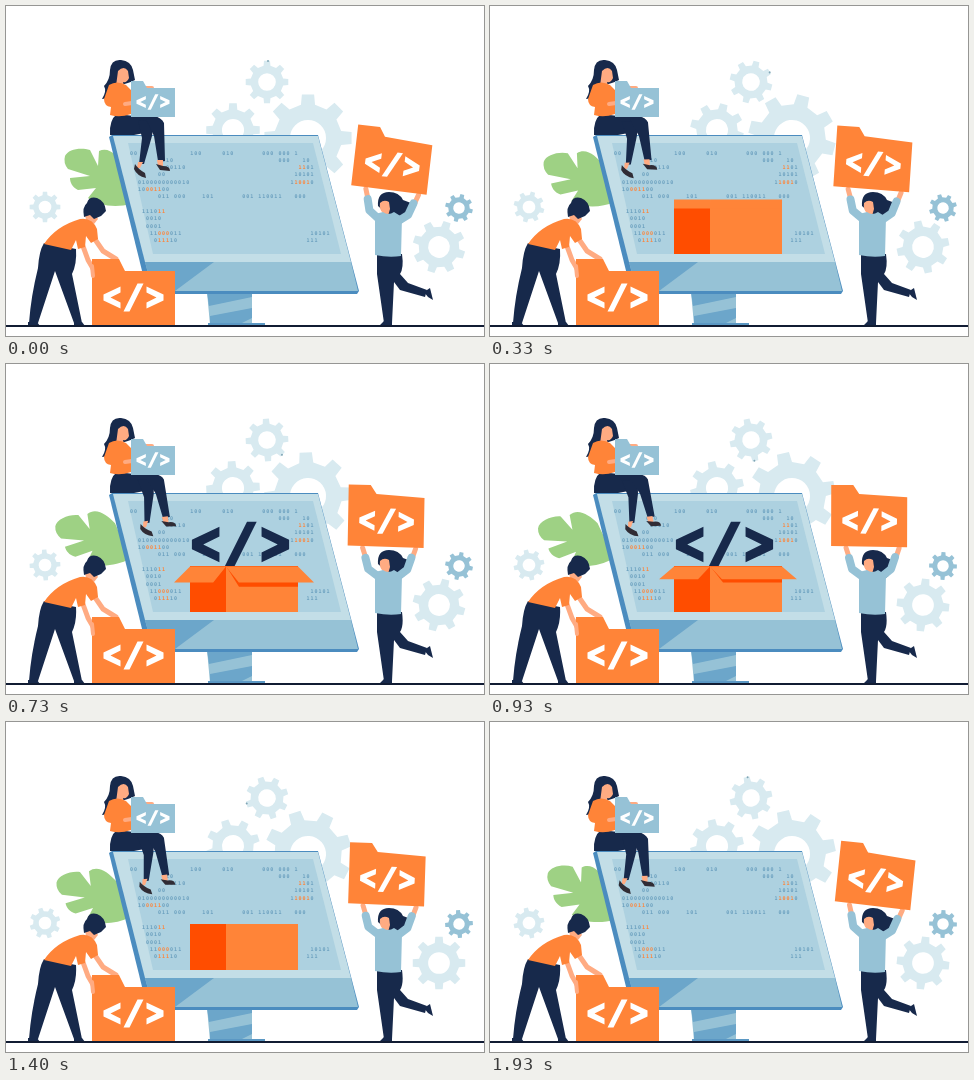
Animation of 478 by 330 pixels, one loop 1990 ms. Source, as an HTML page:

```html
<!DOCTYPE html>
<html lang="en">
<head>
<meta charset="utf-8">
<title>Code team</title>
<style>
html, body { margin: 0; width: 100%; height: 100%; overflow: hidden; background: #fff; }
svg { display: block; width: 478px; height: 330px; }
text { font: bold 5px "DejaVu Sans Mono", monospace; letter-spacing: 1px; fill: #6a9fbe; white-space: pre; }
.o { fill: #ff8438; }
.n { fill: #17294b; }
.b { fill: #96c2d6; }
.s { fill: #ffab82; }
.w { fill: #fff; }
.line { fill: none; stroke-linecap: round; stroke-linejoin: round; }
.skin { stroke: #ffab82; }
</style>
</head>
<body>
<svg viewBox="0 0 478 330">
  <defs>
    <g id="sign">
      <path id="bracket" d="M-13-11V-5L-23 0L-13 5V11L-30 3V-3Z"/>
      <use href="#bracket" transform="scale(-1 1)"/>
      <path d="M4-14H10L-4 14H-10Z"/>
    </g>
    <clipPath id="above"><path d="M150 130H320V205H150Z"/></clipPath>
  </defs>

  <g id="gears"></g>

  <path id="leaf" fill="#9ed184" d="M59 150C62 143 75 141 84 144L92 160L93 145C103 140 112 150 118 160L125 198C110 202 92 200 82 192L90 182L72 184C66 181 64 176 64 172L84 170L62 163Q57 157 59 150Z"/>

  <!-- monitor -->
  <path class="b" d="M201 286H246V319H204Z"/>
  <path fill="#6ca6ca" d="M201 286H246V291L203 300ZM204 310L246 302V312L232 319H204Z"/>
  <path fill="#5b98c4" d="M202 317H259V320H202Z"/>
  <path fill="#4b8cbf" d="M103 131L106 129H312L353 285L351 288H146L141 285Z"/>
  <path fill="#c3dee7" d="M107 130H312L345 256H139Z"/>
  <path class="b" d="M139 256H345L352 285H147Z"/>
  <path fill="#6ca6ca" d="M139 256H208L169 285H147Z"/>
  <path fill="#add1e0" d="M122 137H307L335 248H147Z"/>
  <g id="code"></g>

  <!-- parcel -->
  <g clip-path="url(#above)"><use id="bigSign" class="n" href="#sign"/></g>
  <g id="box">
    <path fill="#ff4d00" d="M184 202H220V248H184Z"/>
    <path class="o" d="M220 202H292V248H220Z"/>
    <path id="shade" fill="#ff4d00"/>
    <path id="flaps" class="o"/>
  </g>

  <!-- seated woman -->
  <path class="n" d="M104 64Q105 53 115 54Q125 55 127 64L129 74Q120 79 113 78Q111 92 96 93Q101 85 98 80Q104 74 104 64Z"/>
  <path class="s" d="M112 65Q118 59 122 65L123 72Q121 77 117 76L118 80H110Z"/>
  <path class="n" d="M104 129Q103 114 111 108L128 110Q147 108 153 112Q158 117 154 124L128 129Z"/>
  <g class="swing">
    <path class="n" d="M132 114L148 116L146 130L138 158H133L136 132Z"/>
    <path class="s" d="M132 156H137L134 162H131Z"/>
    <path fill="#302c35" d="M129 158Q132 163 139 167L140 172Q131 170 128 163Z"/>
  </g>
  <g class="swing">
    <path class="n" d="M140 113Q154 108 158 117L159 155H152L148 130Z"/>
    <path class="s" d="M151 154H157L157 160H152Z"/>
    <path fill="#302c35" d="M150 158L157 160Q164 160 164 165L154 164Z"/>
  </g>
  <path class="o" d="M103 79Q111 74 120 79L125 84V108Q114 112 104 109L105 101Q98 100 98 93Z"/>
  <path class="line skin" stroke-width="4" d="M140 82H146M119 98L126 97"/>
  <path class="b" d="M125 75H137L141 82H169V111H125Z"/>
  <use href="#sign" class="w" transform="translate(147 96)scale(.55)"/>

  <!-- bending woman -->
  <path class="n" d="M38 237L70 243Q71 258 66 268L76 317H68L49 265L32 317H23Q25 290 32 262Q33 245 38 237Z"/>
  <path class="n" d="M22 316H31L34 320H22ZM68 316H76L79 320H68Z"/>
  <path class="line skin" stroke-width="5" d="M74 232L82 254L89 266M86 229L97 245L110 253"/>
  <path class="s" d="M79 207L88 206L92 213L88 218L80 215Z"/>
  <path class="o" d="M38 238Q50 220 74 213Q86 211 91 223L92 233L85 237L80 230L79 241L72 243L70 234L65 244Z"/>
  <path class="n" d="M78 211Q76 201 81 197Q83 190 91 192Q99 195 100 205L95 210L88 213L84 209Z"/>
  <path class="o" d="M86 253H113L119 265H169V319H86Z"/>
  <path class="line skin" stroke-width="4" d="M86 260L87 270"/>
  <use href="#sign" class="w" transform="translate(127.500 291.500)"/>

  <!-- standing woman -->
  <path class="n" d="M371 248H396Q398 262 394 268L402 277L421 284L419 291L394 284L388 276L386 317H378L371 268Z"/>
  <path class="n" d="M378 315H386V320H373ZM418 286L424 282L427 294L422 291Z"/>
  <path class="n" d="M372 200Q371 186 383 186Q393 186 397 194L405 197L402 205Q400 214 391 216L380 207Z"/>
  <g id="lift">
    <path class="line skin" stroke-width="5" d="M356 184L359 193M409 184L406 193"/>
    <path class="line" stroke="#96c2d6" stroke-width="8" d="M359 194L362 205L373 213M405 193L401 205L391 213"/>
    <path class="o" d="M341 121H363L369 130L417 133V183L341 182Z"/>
    <use href="#sign" class="w" transform="translate(379.500 157)rotate(1)scale(.91)"/>
  </g>
  <path class="s" d="M374 197Q378 193 383 196L384 203L382 210L377 207Q373 204 374 197Z"/>
  <path class="b" d="M369 208L377 206Q382 210 388 206L396 211L395 250Q383 252 369 249Z"/>

  <path d="M0 320H478" stroke="#111c33" stroke-width="2"/>
</svg>
<script>
const LOOP = 1990, STEP = 200 / 3;
const $ = id => document.getElementById(id);
const set = (el, value) => el.setAttribute("transform", value);

// 0 before start, 1 after start + time, linear between
const ramp = (t, start, time) => Math.min(1, Math.max(0, (t - start) / time));

function gearPath(r, hole) {
  const points = [];
  for (let i = 0; i < 32; i++) {
    const outer = i % 4 == 1 || i % 4 == 2;
    const angle = (Math.floor(i / 4) * 45 + [-12, -8, 8, 12][i % 4]) * Math.PI / 180;
    const d = outer ? r : r * .77;
    points.push(`${(d * Math.sin(angle)).toFixed(2)} ${(-d * Math.cos(angle)).toFixed(2)}`);
  }
  return `M${points.join("L")}ZM${hole} 0A${hole} ${hole} 0 1 0 ${-hole} 0A${hole} ${hole} 0 1 0 ${hole} 0Z`;
}

function addGear(x, y, r, phase = 0, color = "#d8eaf0") {
  const gear = document.createElementNS("http://www.w3.org/2000/svg", "g");
  gear.innerHTML = `<path d="${gearPath(r, r * .41)}" fill="${color}" fill-rule="evenodd"/>`;
  $("gears").append(gear);
  return turn => set(gear, `translate(${x} ${y})rotate(${turn + phase})`);
}
const gears = [
  addGear(261, 76, 21.5), addGear(302, 132, 44), addGear(227, 124, 27), addGear(39, 201, 15.5),
  addGear(433, 241, 26.5, 18), addGear(453, 202, 14, 14, "#96c2d6")
];
$("gears").firstChild.innerHTML += '<circle cx="1" cy="-21" r="1" fill="#7fa5b5"/>';

// Layout of the screen: # blue digit, @ orange digit
const layout = `\
##             ###     ###       ### ### #
        ###                          ###   ##
         #####                            @@##
       ##                                #####
  #############                         #@@@@#
  ##@@@@##
       ### ###    ###       ### ######   ###

   ####@@
    ####
    ####
     ##@@@###                                #####
      #@@@##                                ###`;
let seed = 7;
const digit = () => (seed = seed * 16807 % 2147483647) % 3 ? 0 : 1;
$("code").innerHTML = layout.split("\n").map((row, i) =>
  `<text x="124" y="${148.5 + i * 7.3}">` +
  row.replace(/@+/g, '<tspan class="o">$&</tspan>').replace(/[#@]/g, digit) + "</text>").join("");

function draw(now) {
  const t = Math.floor((now % LOOP + 3.5) / STEP) * STEP;
  const sway = Math.abs(1 - t / 1000) ** 1.4;

  gears.forEach(turn => turn(t * .18));
  set($("leaf"), `rotate(${-15 * (1 - sway)} 110 200)`);
  set($("lift"), `rotate(${6.6 * sway} 368 217)`);
  document.querySelectorAll(".swing").forEach(leg => set(leg, `rotate(${-9 * (1 - sway)} 146 117)`));

  const grow = ramp(t, 0, 200) - ramp(t, 1467, 200);
  set($("box"), `translate(0 ${248 * (1 - grow)})scale(1 ${grow})`);

  // Flaps lift off the lid, then fold down outside the box
  const open = ramp(t, 133, 400) - ramp(t, 920, 400);
  const dx = 16 - 32 * open, dy = 16 * open ** 4 - 40 * open * (1 - open);
  const flap = (a, b, da, db) => `M${a} 202.500H${b}L${b + db} ${202.5 + dy}H${a + da}Z`;
  $("flaps").setAttribute("d", flap(184, 220, dx, dx * .8) + flap(220, 292, -dx * .8, -dx));
  $("shade").setAttribute("d", `M220 202L233 ${202 + Math.max(0, dy * 1.3)}H292V202Z`);

  const hidden = 1 - ramp(t, 533, 200) + ramp(t, 1050, 200);
  set($("bigSign"), `translate(234.500 ${180.5 + 56 * hidden})scale(${1.62 - .7 * hidden})`);
}

const start = performance.now();
function tick() {
  draw(performance.now() - start);
  requestAnimationFrame(tick);
}
tick();
</script>
</body>
</html>
```
